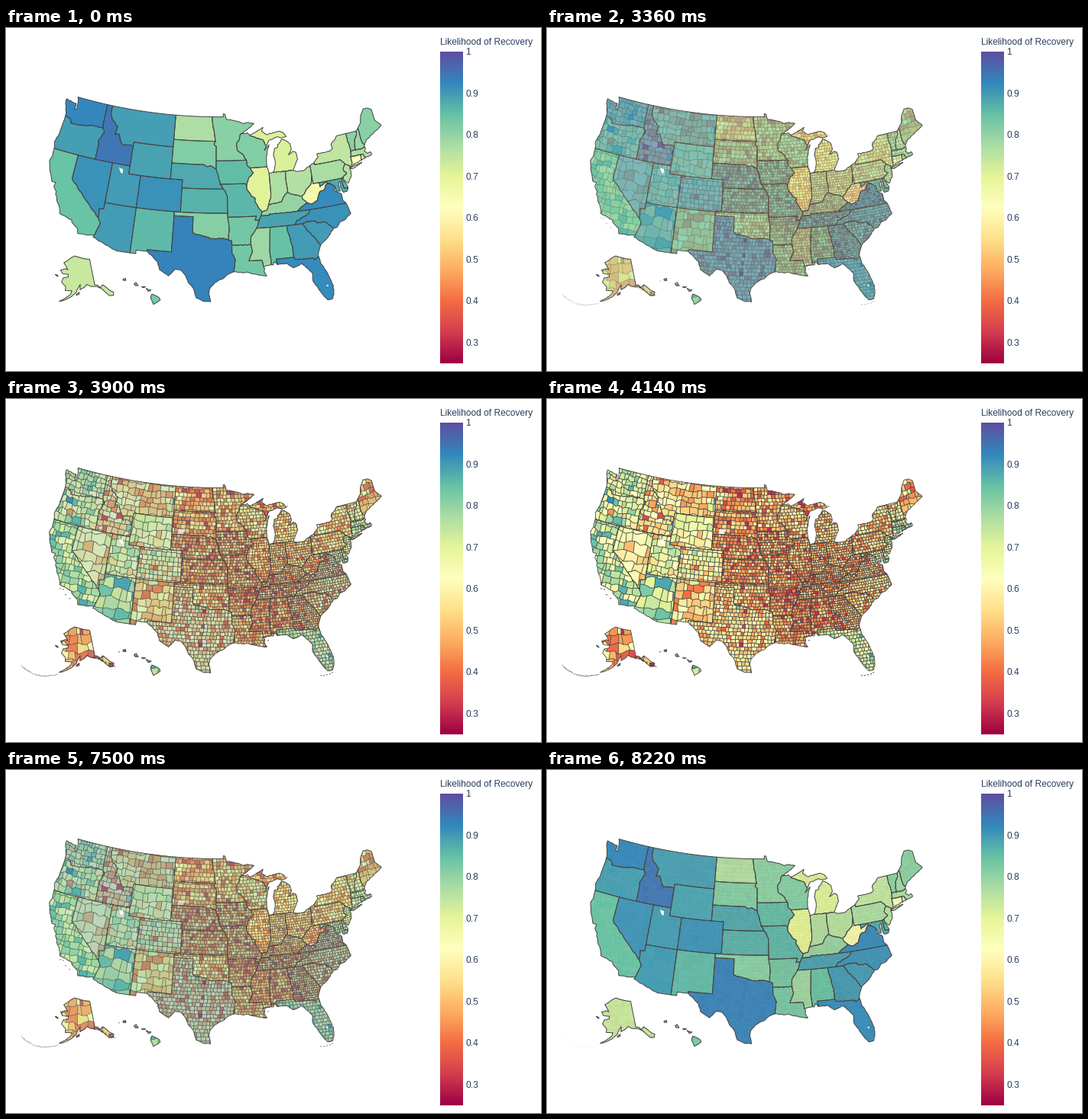
Animation of 700 by 450 pixels, one loop 8.28 s. Source, as a matplotlib script:

```python
import numpy as np
import matplotlib.pyplot as plt
from matplotlib.animation import FuncAnimation
from matplotlib.collections import LineCollection, PolyCollection
from matplotlib.path import Path

W, H, PX = 700, 450, 0.72
INK, TEXT = '#444444', '#2a3f5f'
rng = np.random.default_rng(12)
plt.rcParams['font.family'] = 'Liberation Sans'

fig = plt.figure(figsize=(W / 100, H / 100), dpi=100, facecolor='white')
ax = fig.add_axes([0, 0, 1, 1])
ax.axis('off')
cmap = plt.get_cmap('Spectral')
fading, borders = [], []


def shade(v):
    return cmap((np.asarray(v) - 0.25) / 0.75)


def albers(p1, p2, lon0, clon, clat, k, tx, ty):
    """Equal-area conic projection; longitudes are degrees west."""
    s1, s2 = np.sin(np.radians([p1, p2]))
    n = (s1 + s2) / 2
    c = 1 - s1 ** 2 + 2 * n * s1

    def raw(lam, phi):
        r = np.sqrt(c - 2 * n * np.sin(np.radians(phi))) / n
        a = n * np.radians(lam)
        return np.stack([r * np.sin(a), r * np.cos(a)], -1)

    mid = raw(clon, clat)
    return lambda p: (raw(lon0 - p[..., 0], p[..., 1]) - mid) * k + (tx, ty)


K, CX, CY = 601.5, 273.5, 225
MAIN = albers(29.5, 45.5, 96, -0.6, 38.7, K, CX, CY)
NORTH = albers(55, 65, 154, -2, 58.5, K * 0.35, CX - 0.307 * K, CY + 0.201 * K)
ISLES = albers(8, 18, 157, -3, 19.9, K, CX - 0.205 * K, CY + 0.212 * K)


def A(*v):
    return np.array(v, float).reshape(-1, 2)


def rough(ring):
    """Subdivide a ring; slanted edges get a small wiggle."""
    out = []
    for p, q in zip(ring, np.roll(ring, -1, 0)):
        d = q - p
        m = max(1, int(np.ceil(np.hypot(*d) / 0.35)))
        t = np.arange(m)[:, None] / m
        pts = p + d * t
        if d.all():
            pts[1:] += 0.045 * np.sin(pts[1:] @ A(23, 31, 41, -17))
        out.append(pts)
    return np.vstack(out)


def add(coll, clip=None, fade=True):
    ax.add_collection(coll, autolim=False)
    if clip is not None:
        coll.set_clip_path(Path(clip, closed=False), ax.transData)
    if fade:
        fading.append(coll)


def counties(ring, shape, n, mean, proj):
    """Irregular brick cells, about n of them, clipped to the shape."""
    lo, hi = ring.min(0), ring.max(0)
    x, y = ring.T
    c = np.cos(np.radians(y.mean()))
    area = abs(np.sum(x * np.roll(y, 1) - y * np.roll(x, 1))) / 2 * c
    s = np.sqrt(area / n)
    w = s / c
    jit = 0.13 if s < 0.6 else 0.3
    rows = int((hi[1] - lo[1]) / s) + 3
    cols = int((hi[0] - lo[0]) / w) + 5
    base = lo[1] - rng.random() * s
    knots = np.arange(lo[0] - 3 * w, hi[0] + 4 * w, 0.6 * w)
    noise = rng.uniform(-jit, jit, (rows + 1, len(knots))) * s
    cells = []
    for r in range(rows):
        xs = lo[0] - (1 + rng.random()) * w
        xs = xs + np.cumsum(rng.uniform(1 - 1.8 * jit, 1 + 1.8 * jit, cols)) * w
        top = xs + rng.uniform(-0.6, 0.6, cols) * jit * w
        for i in range(cols - 1):
            b = np.linspace(xs[i], xs[i + 1], 4)
            t = np.linspace(top[i + 1], top[i], 4)
            yb = base + r * s + np.interp(b, knots, noise[r])
            yt = base + (r + 1) * s + np.interp(t, knots, noise[r + 1])
            cells.append(np.c_[np.r_[b, t], np.r_[yb, yt]])
    cells = proj(np.array(cells))
    vals = np.clip(rng.normal(mean, 0.085, len(cells)), 0.3, 0.92)
    add(PolyCollection(cells, facecolors=shade(vals), linewidths=0, zorder=3), shape)
    add(LineCollection(cells[:, [7, 0, 1, 2, 3]], colors=INK,
                       linewidths=0.8 * PX, zorder=4), shape)


def state(value, n, mean, *parts, proj=MAIN):
    ring = rough(np.vstack(parts))
    shape = proj(ring)
    shape = np.vstack([shape, shape[:1]])
    add(PolyCollection([shape], facecolors=[shade(value)], linewidths=0, zorder=1), fade=False)
    edge = LineCollection([shape], colors=INK, linewidths=PX, zorder=2)
    add(edge, fade=False)
    borders.append(edge)
    counties(ring, shape, n, mean, proj)
    add(LineCollection([shape], colors=INK, linewidths=0.8 * PX, zorder=5))


# Borders shared by neighbours
columbia = A(124, 46.25, 123.2, 46.15, 122.8, 45.9, 122.7, 45.6, 121.2, 45.65,
             120.5, 45.7, 119.3, 45.93, 119, 46, 116.92, 46)
snake = A(116.92, 46, 116.5, 45.5, 117.2, 44.4, 117.03, 43.8, 117.03, 42)
colorado = A(114.63, 35, 114.14, 34.3, 114.5, 33.4, 114.72, 32.72)
bitter = A(116.05, 48, 115.7, 47.45, 114.7, 46.7, 114.35, 46.6, 114.55, 45.55,
           113.9, 45.65, 113.4, 44.9, 113, 44.45, 111.5, 44.55, 111.05, 44.5)
red_n = A(97.23, 49, 97.1, 48, 96.8, 47, 96.56, 45.94)
big_stone = A(96.56, 45.94, 96.85, 45.6, 96.45, 45.3, 96.45, 43.5)
niobrara = A(96.45, 42.5, 97.3, 42.85, 98, 42.77, 98.5, 43)
mo_ia = A(96.45, 42.5, 96.1, 41.7, 95.85, 41, 95.77, 40.6)
mo_ks = A(95.3, 40, 94.95, 39.75, 94.61, 39.1, 94.61, 37)
red_s = A(100, 34.56, 99.2, 34.3, 98.1, 34.13, 97.2, 33.85, 96.6, 33.85,
          95.5, 33.9, 94.48, 33.65)
sabine = A(94.04, 33.02, 94.04, 32, 93.55, 31.2, 93.7, 30.3, 93.85, 29.7)
croix = A(92.1, 46.75, 92.29, 46.1, 92.85, 45.6, 92.75, 44.75, 91.9, 44.3, 91.22, 43.5)
wi_mi = A(90.4, 46.57, 89.1, 46.13, 88.1, 45.9, 87.8, 45.35, 87.6, 45.1)
ia_wi = A(91.22, 43.5, 91.1, 42.75, 90.64, 42.5)
ia_il = A(90.64, 42.5, 90.15, 41.9, 91.05, 41.2, 91.4, 40.4)
ia_mo = A(91.4, 40.4, 91.73, 40.6, 95.77, 40.6)
miss1 = A(91.4, 40.4, 91.4, 39.9, 90.7, 39, 90.15, 38.75, 90.2, 38.4, 89.5, 37.3, 89.15, 37)
miss2 = A(90.2, 35, 91.1, 34, 91.17, 33)
miss3 = A(91.17, 33, 91, 32.2, 91.6, 31, 89.73, 31, 89.55, 30.2)
heel = A(89.7, 36, 90.37, 36, 90.1, 36.5, 94.61, 36.5)
ms_al = A(88.2, 35, 88.1, 34.9, 88.47, 31.9, 88.4, 30.35)
al_ga = A(85.6, 35, 85.18, 32.87, 85, 32.3, 85.05, 31.5, 85, 31)
ohio1 = A(89.15, 37, 88.45, 37.1, 88.05, 37.8)
ohio2 = A(88.05, 37.8, 87, 37.9, 86, 38, 85.4, 38.7, 84.82, 39.1)
ohio3 = A(84.82, 39.1, 84.2, 38.8, 83.7, 38.65, 82.6, 38.4)
wabash = A(87.53, 41.7, 87.53, 39.35, 87.6, 38.6, 88.05, 37.8)
ky_wv = A(82.6, 38.4, 82.6, 38.15, 81.97, 37.54)
oh_wv = A(80.52, 40.64, 80.85, 39.7, 81.75, 39.15, 82.2, 38.6, 82.6, 38.4)
tn_nc = A(81.68, 36.6, 82, 36.1, 83, 35.75, 84, 35.4, 84.32, 35)
nc_sc = A(78.55, 33.86, 79.67, 34.8, 80.8, 34.82, 81.05, 35.1, 82.4, 35.2, 83.1, 35)
savannah = A(80.88, 32.05, 81.5, 33, 82.6, 34.2, 83.1, 35)
ga_fl = A(81.45, 30.72, 82.05, 30.36, 82.2, 30.57, 84.86, 30.7, 85, 31)
potomac = A(77.72, 39.32, 78.4, 39.62, 79.48, 39.2)
wv_va = A(77.72, 39.32, 78.35, 39.4, 78.87, 38.76, 79.65, 38.6, 80.3, 37.55,
          81.2, 37.25, 81.97, 37.54)
delaware = A(74.7, 41.36, 75.1, 40.95, 75.2, 40.65, 74.75, 40.2, 75.5, 39.8)
ny_vt = A(73.35, 45, 73.4, 44, 73.25, 43.5, 73.27, 42.75)
vt_nh = A(71.5, 45, 71.6, 44.5, 72.05, 44.1, 72.4, 43.3, 72.46, 42.73)
nh_me = A(71.08, 45.3, 70.98, 43.4, 70.7, 43.08)

# West
state(.925, 39, .7, A(124.7, 48.38, 123.2, 48.15, 122.75, 48.15, 122.7, 47.4, 122.35, 47.5,
      122.5, 48.5, 122.76, 49, 117.03, 49, 117.03, 46.4), columbia[::-1],
      A(124.1, 46.8, 124.7, 48))
state(.895, 36, .68, columbia, snake, A(124.2, 42, 124.5, 42.8, 124.1, 44))
state(.845, 58, .74, A(124.2, 42, 120, 42, 120, 39), colorado,
      A(117.12, 32.53, 117.3, 33.1, 118.4, 33.75, 118.5, 34.03, 119.2, 34.15, 120.5, 34.45,
        120.65, 34.9, 121.9, 36.6, 121.9, 36.95, 122.5, 37.5, 122.4, 38, 123, 38,
        123.8, 39.2, 124.35, 40.4, 124.1, 41))
state(.91, 17, .6, A(120, 42, 114.04, 42, 114.04, 36.2, 114.74, 36.1, 114.63, 35, 120, 39))
state(.9, 29, .64, A(114.04, 42, 111.05, 42, 111.05, 41, 109.05, 41, 109.05, 37, 114.04, 37))
state(.9, 15, .78, A(114.04, 37, 109.05, 37, 109.05, 31.33, 111.07, 31.33, 114.81, 32.5),
      colorado[::-1], A(114.74, 36.1, 114.04, 36.2))
state(.945, 44, .57, A(117.03, 49, 116.05, 49), bitter, A(111.05, 42), snake[::-1],
      A(117.03, 46.4))
state(.895, 56, .54, A(116.05, 49, 104.05, 49, 104.05, 45, 111.05, 45), bitter[::-1])
state(.89, 23, .62, A(111.05, 45, 104.05, 45, 104.05, 41, 111.05, 41))
state(.91, 64, .62, A(109.05, 41, 102.05, 41, 102.05, 37, 109.05, 37))
state(.86, 33, .54, A(109.05, 37, 103, 37, 103, 32, 106.62, 32, 106.53, 31.78, 108.2, 31.78,
      108.2, 31.33, 109.05, 31.33))

# Plains
state(.77, 53, .45, A(104.05, 49), red_n, A(104.05, 45.94))
state(.82, 66, .46, A(104.05, 45.94), big_stone, niobrara, A(104.05, 43))
state(.88, 93, .45, A(104.05, 43), niobrara[::-1], mo_ia,
      A(95.3, 40, 102.05, 40, 102.05, 41, 104.05, 41))
state(.87, 105, .44, A(102.05, 40), mo_ks, A(102.05, 37))
state(.815, 77, .49, A(103, 37, 94.61, 37, 94.43, 35.4), red_s[::-1],
      A(100, 36.5, 103, 36.5))
state(.93, 254, .55, A(103, 36.5, 100, 36.5), red_s, A(94.04, 33.55), sabine,
      A(94.7, 29.4, 95.2, 29, 96.5, 28.4, 97.2, 27.7, 97.4, 27, 97.14, 25.95, 98.2, 26.05,
        99.1, 26.4, 99.5, 27.5, 100.3, 28.3, 100.7, 29.1, 101.4, 29.77, 102.3, 29.88,
        102.8, 29.3, 103.15, 28.98, 104.5, 29.65, 104.9, 30.6, 106.53, 31.78, 106.62, 32,
        103, 32))
state(.81, 87, .49, A(97.23, 49, 95.15, 49, 95.15, 49.38, 94.8, 49.3, 94.6, 48.72, 93.5, 48.55,
      92.5, 48.4, 91.5, 48.07, 90.8, 48.2, 89.5, 48, 90.8, 47.3), croix, big_stone[::-1],
      red_n[::-1])
state(.855, 99, .46, A(96.45, 43.5), ia_wi, ia_il, ia_mo, mo_ia[::-1])
state(.865, 115, .45, ia_mo[::-1], miss1, A(89.4, 36.5), heel, mo_ks[::-1])
state(.835, 75, .42, heel[::-1], miss2, A(94.04, 33.02, 94.04, 33.55, 94.48, 33.65, 94.43, 35.4))
state(.835, 64, .47, A(94.04, 33.02), miss3,
      A(89.4, 30, 89.5, 29.6, 89.15, 29, 90, 29.15, 91.3, 29.4, 91.8, 29.6, 92.3, 29.55),
      sabine[::-1])

# Lakes and Ohio valley
state(.82, 72, .51, A(92.1, 46.75, 90.8, 46.9), wi_mi,
      A(88, 44.55, 87.1, 45.2, 87.5, 44.4, 87.75, 43.6, 87.8, 42.5), ia_wi[::-1], croix[::-1])
state(.705, 102, .47, A(90.64, 42.5, 87.8, 42.5), wabash, ohio1[::-1], miss1[::-1], ia_il[::-1])
state(.77, 92, .48, A(87.53, 41.7, 86.82, 41.76, 84.81, 41.72), ohio2[::-1], wabash[::-1])
state(.765, 88, .49, A(84.81, 41.72, 83.45, 41.73, 82.7, 41.5, 81.7, 41.5, 80.52, 41.98),
      oh_wv, ohio3[::-1])
state(.715, 68, .53, A(84.81, 41.72, 83.45, 41.73, 83.1, 42.2, 82.45, 43, 82.6, 43.9, 83, 44.05,
      83.9, 43.7, 83.3, 44.3, 83.4, 45.05, 84.1, 45.5, 84.75, 45.75, 85.1, 45.4, 85.6, 45.1,
      85.6, 44.8, 86.2, 44.7, 86.5, 43.9, 86.3, 43, 86.6, 42, 86.82, 41.76))
state(.715, 15, .47, wi_mi, A(87, 45.75, 86.3, 45.9, 85.5, 46.1, 84.75, 45.9, 83.9, 46,
      84.3, 46.5, 85, 46.75, 86.2, 46.65, 87.4, 46.5, 88.2, 46.95, 87.9, 47.45, 88.5, 47.2,
      89.6, 46.83))
state(.8, 120, .45, A(89.4, 36.5), ohio1, ohio2, ohio3, ky_wv,
      A(83.68, 36.6, 88.05, 36.65, 88.05, 36.5))
state(.66, 55, .45, A(80.52, 39.72, 79.48, 39.72), potomac[::-1], wv_va, ky_wv[::-1],
      oh_wv[::-1])

# South
state(.89, 95, .46, A(89.4, 36.5, 88.05, 36.5, 88.05, 36.65, 83.68, 36.6), tn_nc,
      A(90.2, 35, 89.7, 36))
state(.79, 82, .4, ms_al, miss3[::-1], miss2[::-1])
state(.85, 67, .44, al_ga, A(87.6, 31, 87.5, 30.3, 87.9, 30.7, 88.1, 30.3), ms_al[::-1])
state(.9, 159, .47, A(85.6, 35), savannah[::-1], A(81.3, 31.3), ga_fl, al_ga[::-1])
state(.92, 67, .71, A(87.6, 31), ga_fl[::-1], A(81.3, 29.9, 80.55, 28.45, 80.03, 26.8,
      80.15, 25.75, 80.4, 25.2, 81.1, 25.13, 81.8, 26.1, 82.2, 26.9, 82.75, 27.8, 82.65, 28.7,
      83.4, 29.5, 84, 30.1, 85.3, 29.7, 86.2, 30.35, 87.5, 30.3))
state(.9, 46, .52, nc_sc, savannah[::-1], A(80, 32.6, 79.2, 33.2))
state(.91, 100, .53, A(75.9, 36.6, 75.5, 35.25, 76.5, 34.65, 77.5, 34.4, 78, 33.87), nc_sc,
      tn_nc[::-1])
state(.92, 120, .53, A(77.72, 39.32, 77.1, 38.9, 77.3, 38.4, 76.3, 37.8, 76.3, 37, 75.9, 36.6,
      81.68, 36.6, 83.68, 36.6), wv_va[::-1])

# Northeast
state(.88, 24, .67, A(79.48, 39.72, 75.79, 39.72, 75.7, 38.46, 75.05, 38.45, 75.35, 38,
      75.9, 37.95, 76.2, 38.6, 76.1, 39.4, 76.45, 39.1, 76.4, 38.2, 77, 38.3, 77.1, 38.9),
      potomac)
state(.86, 3, .72, A(75.79, 39.72, 75.5, 39.8, 75.5, 39.4, 75.05, 38.45, 75.7, 38.46))
state(.775, 67, .53, A(80.52, 41.98, 79.76, 42.27, 79.76, 42, 75.35, 42), delaware,
      A(75.79, 39.72, 80.52, 39.72, 80.52, 40.64))
state(.76, 21, .72, A(74.7, 41.36, 73.95, 41, 74.1, 40.6, 74, 40.3, 74.1, 39.75, 74.9, 38.95,
      75.5, 39.5), delaware[::-1])
state(.75, 60, .54, A(79.76, 42.27, 78.9, 42.85, 79.05, 43.27, 76.8, 43.3, 76.2, 43.6,
      76.3, 44.1, 75, 45), ny_vt, A(73.5, 42.05, 73.5, 41.3, 73.65, 41, 73.95, 40.65,
      73.95, 41, 74.7, 41.36, 75.35, 42, 79.76, 42))
state(.75, 4, .72, A(74, 40.6, 73.75, 40.85, 72.6, 40.98, 71.9, 41.07, 72.5, 40.83, 73.5, 40.58))
state(.81, 14, .62, A(73.35, 45), vt_nh, ny_vt[::-1])
state(.79, 10, .64, A(71.5, 45), nh_me, A(70.82, 42.87, 71.3, 42.7), vt_nh[::-1])
state(.81, 16, .47, A(71.08, 45.3, 70.4, 45.8, 70, 46.7, 69.2, 47.45, 68.3, 47.35, 67.8, 47.07,
      67.8, 45.7, 66.95, 44.82, 68.2, 44.35, 69, 44.05, 70.2, 43.6), nh_me[::-1])
state(.77, 14, .71, A(73.27, 42.75, 72.46, 42.73, 71.3, 42.7, 70.82, 42.87, 70.7, 42.6, 71, 42.3,
      70.6, 41.95, 70.1, 42.05, 69.95, 41.7, 70.65, 41.55, 71.12, 41.5, 71.38, 42.02,
      73.5, 42.05))
state(.64, 8, .72, A(73.5, 42.05, 71.8, 42.02, 71.85, 41.32, 73.65, 41, 73.5, 41.3))
state(.72, 5, .68, A(71.8, 42.02, 71.38, 42.02, 71.12, 41.5, 71.85, 41.32))

# Alaska and Hawaii
state(.74, 14, .49, A(156.5, 71.3, 152, 70.85, 145, 70, 141, 69.65, 141, 60.3, 139, 60,
      137.5, 58.9, 135.5, 59.7, 133.5, 58.4, 132, 57, 130, 55.9, 131, 54.9, 133.3, 55.3,
      135.5, 57.2, 136.6, 58.3, 139.8, 59.6, 144, 60, 146.5, 60.9, 148.5, 60, 151.8, 59.2,
      151.5, 61, 153.5, 59.5, 154.3, 58.3, 158, 56.5, 162.5, 55, 164.8, 54.6, 161.5, 55.9,
      158, 57.6, 157.5, 58.8, 162, 58.7, 162, 60, 165.5, 61.5, 164.7, 63, 161, 63.6,
      161, 64.5, 166, 64.5, 168, 65.6, 164, 66.4, 162, 66.1, 163.7, 67.2, 166.5, 68.4,
      163, 69.5, 161, 70.3), proj=NORTH)
state(.74, 1, .45, A(154.5, 57.3, 152.5, 57.5, 152.4, 58.3, 153.8, 57.8), proj=NORTH)
state(.74, 1, .45, A(171.6, 63.6, 170, 63.6, 168.9, 63.2, 170.5, 63.3), proj=NORTH)
for island in (A(155.9, 20.25, 155.1, 19.9, 154.8, 19.5, 155.7, 18.95, 156.05, 19.7),
               A(156.65, 20.95, 156, 20.75, 156.4, 20.6),
               A(157.25, 21.15, 156.75, 21.15, 157, 21.07),
               A(158.25, 21.55, 157.97, 21.7, 157.7, 21.3, 158.1, 21.3),
               A(159.75, 22.1, 159.4, 22.2, 159.35, 21.95, 159.7, 21.95)):
    state(.83, 1, .76, island, proj=ISLES)

# Small islands that only the county map shows
dashes = []
for w in np.arange(165.3, 188, 0.65):
    lat = 51.6 + 0.0125 * (w - 179) ** 2 + rng.uniform(-0.15, 0.15)
    dashes.append(NORTH(A(w, lat, w + rng.uniform(0.2, 0.6), lat - 0.12)))
for _ in range(26):
    t = rng.random()
    x, y = 112 + 29 * t + rng.normal(0, 1), 337.5 + 12 * t + rng.normal(0, 0.7)
    dashes.append(A(x, y, x + 1.6, y + 1.4))
for x, y in ((70, 249), (74, 250), (82, 262), (77, 257), (411, 363), (415, 363), (419, 362),
             (423, 361), (426, 359), (342, 317), (367, 141), (147, 332)):
    dashes.append(A(x, y, x + 2, y - 0.5))
add(LineCollection(dashes, colors=INK, linewidths=PX, zorder=5))

add(PolyCollection([A(225, 170.5, 231.5, 170.5, 231.5, 177, 225, 177)],
                   facecolors='#f1f1f5', linewidths=0, zorder=6))
lakes = [A(148, 182.5, 150.5, 184.5, 153, 185, 152.8, 190.5, 150.5, 190.3, 149, 187),
         A(419.5, 336.8, 421.5, 336.8, 421.8, 339, 419.8, 339)]
add(PolyCollection(lakes, facecolors='white', linewidths=0, zorder=6), fade=False)

# Colour bar
ax.imshow(np.linspace(1, 0, 409)[:, None], cmap=cmap, extent=(568, 598, 440, 31), aspect='auto')
ax.text(568, 22, 'Likelihood of Recovery', size=12 * PX, color=TEXT)
for v in range(3, 11):
    ax.text(601, 440 - (v / 10 - 0.25) / 0.75 * 409 + 4.2, f'{v / 10:g}', size=12 * PX, color=TEXT)
ax.set_xlim(0, W)
ax.set_ylim(H, 0)


def draw(i):
    a = np.clip((i - 49) / 20, 0, 1) - np.clip((i - 118) / 20, 0, 1)
    for art in fading:
        art.set_visible(a > 0)
        art.set_alpha(a)
    for edge in borders:
        edge.set_visible(a < 1)
    return []


anim = FuncAnimation(fig, draw, frames=138, interval=60, init_func=lambda: draw(0),
                     repeat=True, repeat_delay=0)
plt.show()
```
